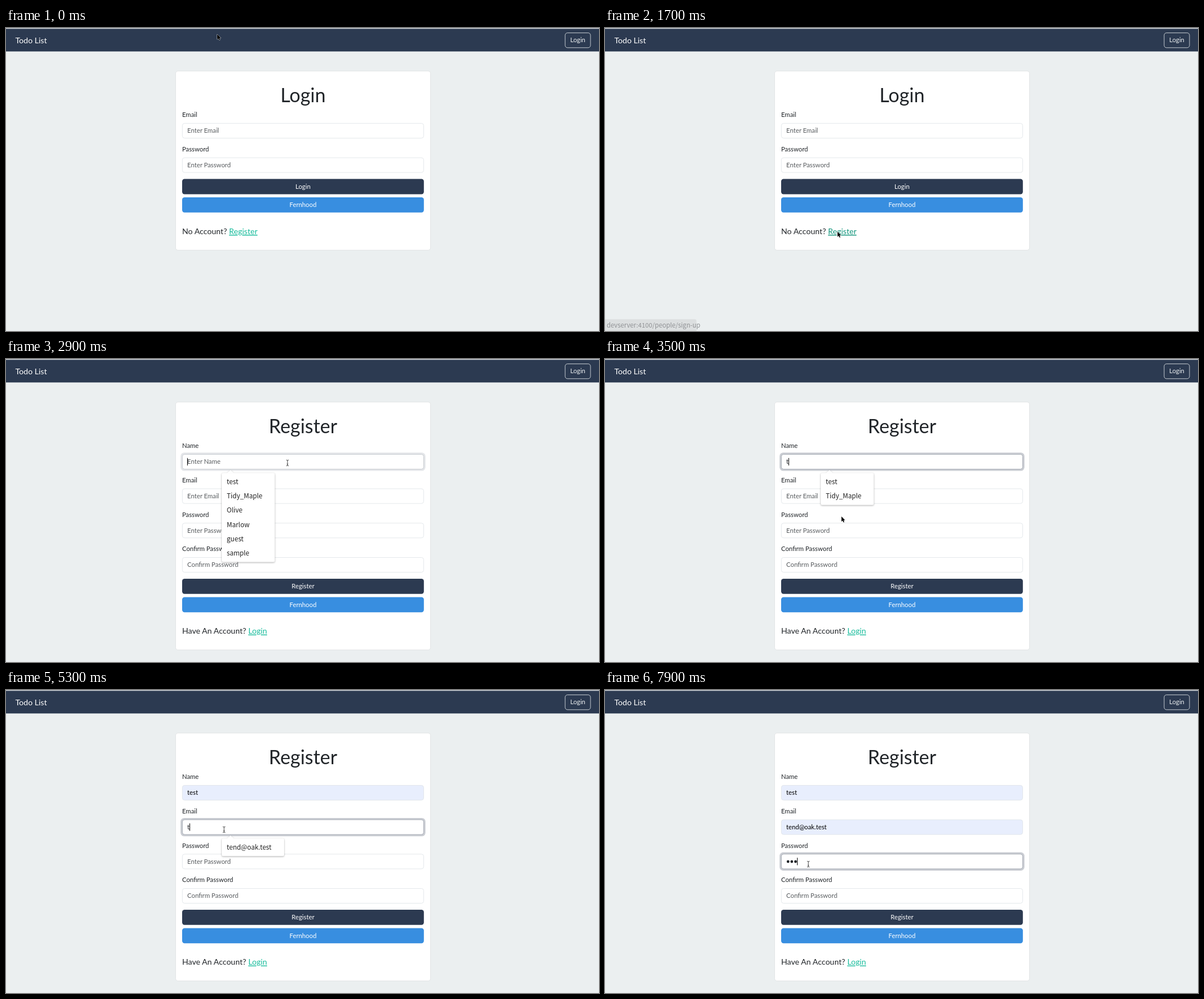
An HTML page that plays this animation: 1047 px wide and 535 px high, repeating every 8000 ms.

```html
<!DOCTYPE html>
<html lang="en">
<head>
<meta charset="utf-8">
<title>Todo List</title>
<style>
  html, body { margin: 0; width: 100%; height: 100%; overflow: hidden; background: #ebeff0; }
  svg { display: block; width: 1047px; height: 535px; font: 11.29px Lato, sans-serif; }
  .mid { text-anchor: middle; }
  .ui { font-family: "Noto Sans CJK TC", "Noto Sans CJK JP", "Noto Sans", sans-serif; }
  .menu { filter: drop-shadow(0 1px 1.5px rgba(0, 0, 0, .32)); }
  .popup { filter: drop-shadow(0 1px 1.5px rgba(0, 0, 0, .5)); }
</style>
</head>
<body>
<svg id="stage" viewBox="0 0 1047 535"></svg>
<script>
const stage = document.getElementById("stage");
const LOOP = 8000, STEP = 100;
const NAVY = "#2c3a51", BLUE = "#388ee0", INK = "#212529", HINT = "#585c5f";
const LEFT = 311, WIDE = 426.8, TALL = 26.8, PITCH = 60.7, FIRST = 168, ROW = 25.2;
const NAMES = ["test", "Tidy_Maple", "Olive", "Marlow", "guest", "sample"];
const MAILS = ["tend@oak.test", "olive.reed@willow.test", "marlow@oak.test",
               "guest@oak.test", "sample@pine.test", "note@willow.test"];

const ruler = document.createElement("canvas").getContext("2d");
ruler.font = "11.29px Lato, sans-serif";

// Pointer keys: time, x, y
const PATH = [
  [100, 373, 11], [400, 300, 75], [700, 222, 200], [1000, 204.5, 316],
  [1300, 330, 352], [1600, 410.5, 359.5], [1700, 410.5, 359.5], [1900, 292, 291],
  [2000, 251.5, 268], [2200, 195, 238], [2500, 497, 183.5], [3100, 497, 183.5],
  [3200, 440, 295], [3300, 417.5, 278], [3500, 417.5, 278], [3700, 406, 246],
  [3800, 406, 246], [3900, 404, 222], [4200, 398, 217], [4300, 398, 217],
  [4400, 394, 257], [4500, 394, 257], [4600, 385, 246.5], [5500, 385, 246.5],
  [5600, 397, 269], [5700, 397, 269], [5800, 388, 277], [5900, 388, 277],
  [6000, 386.5, 281.5], [6200, 386.5, 281.5], [6300, 376, 320], [6400, 359, 307.5]
];

const within = (t, a, b) => t >= a && t < b;

function pointAt(t) {
  if (t <= PATH[0][0]) return PATH[0].slice(1);
  for (let i = 1; i < PATH.length; i++) {
    const [t0, x0, y0] = PATH[i - 1], [t1, x1, y1] = PATH[i];
    if (t <= t1) {
      const k = (t - t0) / (t1 - t0);
      return [x0 + (x1 - x0) * k, y0 + (y1 - y0) * k];
    }
  }
  return PATH[PATH.length - 1].slice(1);
}

// Focus ring strength: half while it fades, full in between
function glow(t, on, full, off, gone) {
  if (within(t, full, off)) return 1;
  return within(t, on, gone) ? .5 : 0;
}

const rect = (x, y, w, h, fill, extra = "") =>
  `<rect x="${x}" y="${y}" width="${w}" height="${h}" fill="${fill}" ${extra}/>`;
const text = (x, y, s, fill = INK, extra = "") =>
  `<text x="${x}" y="${y}" fill="${fill}" ${extra}>${s}</text>`;

const button = (y, label, fill) =>
  rect(LEFT, y, WIDE, TALL, fill, 'rx="4.2"') +
  text(524.4, y + 17.2, label, "#fff", 'class="mid"');

function field(i, label, hint, { value = "", dots = 0, filled = false, focus = 0, caret = false } = {}) {
  const y = FIRST + PITCH * i;
  let out = text(LEFT, y - 10.9, label);
  if (focus) {
    out += rect(LEFT - 2.8, y - 2.8, WIDE + 5.6, TALL + 5.6, NAVY, `rx="6.5" fill-opacity="${.25 * focus}"`);
  }
  const edge = focus === 1 ? "#969ca7" : focus ? "#bbc0c7" : "#dee2e6";
  out += rect(LEFT + .35, y + .35, WIDE - .7, TALL - .7, filled ? "#e8eefd" : "#fff",
              `rx="4" stroke="${edge}" stroke-width=".8"`);
  const base = y + 17.2;
  for (let n = 0; n < dots; n++) {
    out += `<circle cx="${323.2 + 6.6 * n}" cy="${y + 13.6}" r="2.4" fill="${INK}"/>`;
  }
  if (value) out += text(320.1, base, value, filled ? "#000" : INK);
  else if (!dots) out += text(320.1, base, hint, HINT);
  if (caret) {
    const x = 320.1 + (dots ? dots * 6.6 - .6 : ruler.measureText(value).width);
    out += rect(x - .2, y + 6.8, 1, 13.2, "#000");
  }
  return out;
}

function menu(i, items, width, hover, opacity) {
  const x = 381, y = 201.3 + PITCH * i;
  let out = `<path d="M${x + 9} ${y + .5}l6.3 -5.5 6.3 5.5z" fill="#fff"/>` +
            rect(x, y, width, items.length * ROW + 6, "#fff", 'rx="2.5"');
  items.forEach((item, n) => {
    const top = y + 3 + ROW * n;
    if (n === hover) out += rect(x, top, width, ROW, "#e6e6e6");
    out += text(x + 8.8, top + 16.7, item, "#222", 'class="ui" font-size="11.65"');
  });
  return `<g class="menu" opacity="${opacity}">${out}</g>`;
}

function header() {
  return rect(0, 0, 1047, 535, "#ebeff0") + rect(0, 0, 1047, 2, "#d9dcde") +
    rect(0, 1.4, 1047, 40, NAVY) +
    text(16.4, 26.5, "Todo List", "#fff", 'font-size="14.1"') +
    rect(987.2, 8.6, 44.8, 26.2, "none", 'rx="4.2" stroke="#ecf0f1" stroke-width=".8"') +
    text(1009.6, 25.3, "Login", "#ecf0f1", 'class="mid"');
}

function card(title, height, prompt, link, linkFill) {
  return rect(299.5, 76, 450, height, "#fff", 'rx="4.2" stroke="#dcdfe0" stroke-width=".8"') +
    text(524.4, 131.2, title, INK, 'class="mid" font-size="33.87"') +
    text(LEFT, 47.7 + height, `${prompt} <tspan fill="${linkFill}" text-decoration="underline">${link}</tspan>`,
         INK, 'font-size="14.1"');
}

function loginPage(t) {
  const hot = within(t, 1500, 1800);
  let out = card("Login", 316.3, "No Account?", "Register", hot ? "#14967d" : "#18bc9c") +
    field(0, "Email", "Enter Email") + field(1, "Password", "Enter Password") +
    button(266.6, "Login", NAVY) + button(299, "Fernhood", BLUE);
  if (t >= 1600) {
    out += rect(-4, 514.3, 165.5, 25, "#dcdfe0", 'rx="3"') +
      text(3, 529, "devserver:4100/people/sign-up", "#8f9194", 'class="ui" font-size="11.3"');
  }
  return out;
}

function registerPage(t) {
  const name = { focus: glow(t, 2900, 3000, 4700, 4900), filled: t >= 3700 };
  name.value = t >= 3900 ? "test" : t >= 3700 ? NAMES[1] : t >= 3500 ? "t" : "";
  name.caret = within(t, 2900, 3700) || within(t, 4200, 4700);

  const mail = { focus: glow(t, 4700, 4900, 6500, 6700), filled: t >= 5800 };
  mail.value = t >= 5800 ? MAILS[0] : t >= 5300 ? "t" : "";
  mail.caret = within(t, 4700, 5800) || within(t, 6100, 6500);

  const pass = { focus: glow(t, 6500, 6700, LOOP, LOOP), caret: t >= 6500 };
  pass.dots = [7000, 7500, 7800].filter(k => t >= k).length;

  let out = card("Register", 437.7, "Have An Account?", "Login", "#18bc9c") +
    field(0, "Name", "Enter Name", name) + field(1, "Email", "Enter Email", mail) +
    field(2, "Password", "Enter Password", pass) +
    field(3, "Confirm Password", "Confirm Password") +
    button(388, "Register", NAVY) + button(420.4, "Fernhood", BLUE);

  if (within(t, 2900, 3500)) out += menu(0, NAMES, 93.5, -1, 1);
  if (within(t, 3500, 4400)) {
    out += menu(0, NAMES.slice(0, 2), 93.5, t >= 3900 ? 0 : t >= 3700 ? 1 : -1, t >= 4200 ? .5 : 1);
  }
  if (within(t, 4700, 5300)) out += menu(1, MAILS, 162, -1, 1);
  if (within(t, 5300, 6300)) {
    out += menu(1, MAILS.slice(0, 1), 110, t >= 5800 ? 0 : -1, t >= 6100 ? .5 : 1);
  }
  if (within(t, 1900, 2900)) out += popup(t < 2000 ? .5 : 1);
  return out;
}

function popup(opacity) {
  const indigo = "#3d41dc", grey = "#5f6368";
  let out = rect(709.5, -4, 217, 69.6, "#f1f1f1", 'rx="2.5"') + rect(709.5, 1, 217, 31, "#fff") +
    rect(721, 25, 148, .8, "#e2e2e2") + rect(721, 24, 51, 1.8, indigo) +
    text(746.2, 19, "英文", indigo, 'class="ui mid" font-size="11.2" font-weight="700"') +
    text(786.6, 19, "中文（繁體）", grey, 'class="ui" font-size="11.2" font-weight="500"') +
    text(720.5, 51.8, '<tspan font-weight="700">Quarvo</tspan> Translate', "#66696c", 'font-size="8.5"') +
    `<path d="M903 11.8l6.4 6.4m0 -6.4l-6.4 6.4" stroke="#4b4f53" stroke-width="1.3"/>`;
  for (const y of [11, 15, 19]) out += `<circle cx="883.6" cy="${y}" r="1.2" fill="#4b4f53"/>`;
  return `<g class="popup" opacity="${opacity}">${out}</g>`;
}

function pointer(t) {
  if (within(t, 5100, 5300) || within(t, 7100, 7900)) return "";
  const [x, y] = pointAt(t);
  const beam = within(t, 2500, 3200) || within(t, 4600, 5600) || t >= 6400;
  const shape = beam
    ? `<path d="M-2.2 -5.2Q0 -5.2 0 -3.8Q0 -5.2 2.2 -5.2M0 -4V4M-2.2 5.2Q0 5.2 0 3.8Q0 5.2 2.2 5.2M-1.2 2.2H1.2"
         fill="none" stroke="#333" stroke-width=".9"/>`
    : `<path d="M0 0V9.2L2.1 7.3L3.5 10.6L5.1 9.9L3.7 6.7H6.4Z" fill="#000" stroke="#fff"
         stroke-width=".8" paint-order="stroke"/>`;
  return `<g transform="translate(${x} ${y})">${shape}</g>`;
}

function draw(t) {
  stage.innerHTML = header() + (t < 1800 ? loginPage(t) : registerPage(t)) + pointer(t);
}

const start = performance.now();
let shown = -1;
function tick() {
  const t = Math.floor((performance.now() - start) % LOOP / STEP) * STEP;
  if (t !== shown) draw(shown = t);
  requestAnimationFrame(tick);
}
tick();
</script>
</body>
</html>
```
